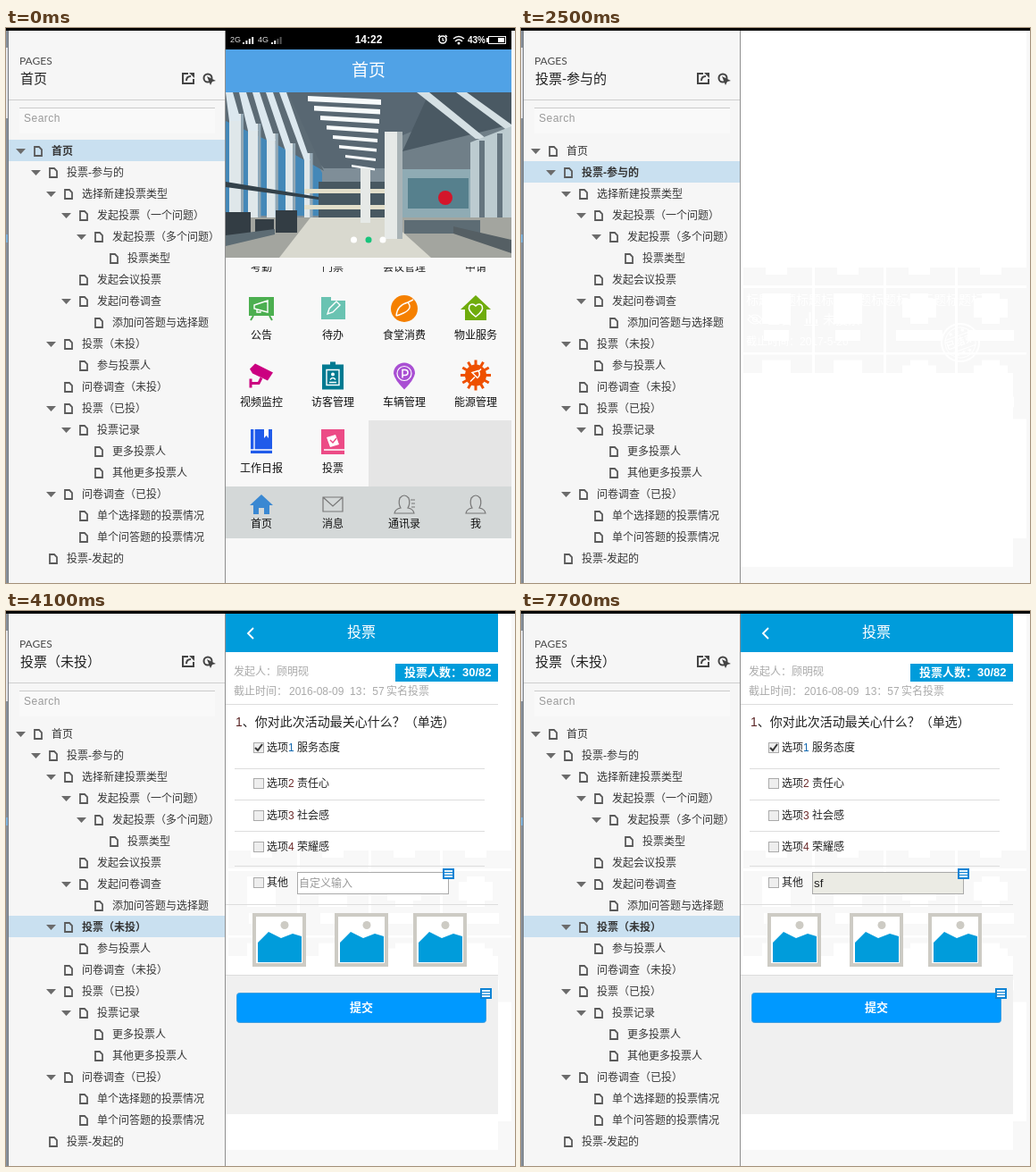
Write an HTML page with a canvas that moves like this. It is 570 by 621 pixels and loops after 8000 ms.

```html
<!DOCTYPE html>
<html lang="zh-CN">
<head>
<meta charset="utf-8">
<style>
html, body { margin: 0; width: 100%; height: 100%; overflow: hidden; background: #f8f8f8 }
canvas { display: block }
</style>
</head>
<body>
<canvas id="stage" width="570" height="621"></canvas>
<script>
const ctx = document.getElementById('stage').getContext('2d');
const FONT = '"Liberation Sans", "Noto Sans CJK SC", sans-serif';
const LOOP = 8000, BLUE = '#009cdb', PALE = '#f8f8f8';

// ---- helpers ----
function rect(x, y, w, h, color) {
  ctx.fillStyle = color;
  ctx.fillRect(x, y, w, h);
}
function frame(x, y, w, h, color) {
  ctx.strokeStyle = color;
  ctx.lineWidth = 1;
  ctx.strokeRect(x + .5, y + .5, w - 1, h - 1);
}
// y is the visual middle of the glyphs; returns the x where the text ends.
function text(s, x, y, size, color, align = 'left', weight = 400, font = FONT) {
  ctx.font = `${weight} ${size}px ${font}`;
  ctx.fillStyle = color;
  ctx.textAlign = align;
  ctx.textBaseline = 'middle';
  ctx.fillText(s, x, y + 1);
  return x + ctx.measureText(s).width;
}
// Each part is [path, color] to fill or [path, color, width] to stroke.
function draw(x, y, parts) {
  ctx.save();
  ctx.translate(x, y);
  for (const [d, color, width] of parts) {
    const path = new Path2D(d);
    ctx.fillStyle = ctx.strokeStyle = color;
    ctx.lineWidth = width || 1;
    if (width) ctx.stroke(path); else ctx.fill(path);
  }
  ctx.restore();
}
function clipped(x, y, w, h, paint) {
  ctx.save();
  ctx.beginPath();
  ctx.rect(x, y, w, h);
  ctx.clip();
  paint();
  ctx.restore();
}
const circle = (x, y, r) => `M${x - r} ${y}a${r} ${r} 0 1 0 ${2 * r} 0a${r} ${r} 0 1 0 ${-2 * r} 0z`;
function rays(count, inner, outer) {
  let d = '';
  for (let i = 0; i < count; i++) {
    const a = 2 * Math.PI * i / count, c = Math.cos(a), s = Math.sin(a);
    d += `M${c * inner} ${s * inner}L${c * outer} ${s * outer}`;
  }
  return d;
}

// ---- page tree: level digit, then title ----
const pages = `0首页
1投票-参与的
2选择新建投票类型
3发起投票（一个问题）
4发起投票（多个问题）
5投票类型
3发起会议投票
3发起问卷调查
4添加问答题与选择题
2投票（未投）
3参与投票人
2问卷调查（未投）
2投票（已投）
3投票记录
4更多投票人
4其他更多投票人
2问卷调查（已投）
3单个选择题的投票情况
3单个问答题的投票情况
1投票-发起的`.split('\n').map(s => ({ level: +s[0], title: s.slice(1) }));

function sidebar(selected) {
  rect(0, 0, 246, 621, '#f6f6f6');
  rect(0, 0, 2, 621, '#87909c');
  rect(0, 22, 2, 79, '#e4e6ea');
  rect(0, 231, 2, 9, '#7fb2dc');
  rect(2, 0, 1, 621, '#74797f');
  rect(245, 3, 1, 618, '#8f8f8f');
  text('PAGES', 15, 36, 12, '#4a4a4a', 'left', 400, 'Lato, sans-serif');
  text(pages[selected].title, 16, 57, 15, '#222', 'left', 500);
  draw(197, 50, [
    ['M7 1H1V12H13V7', '#444', 2], ['M5 9Q5 4 10 4', '#444', 2], ['M8 0H14V6z', '#444'],
    [circle(29, 6, 4.5), '#444', 2], ['M28 4L38 9L34 10L32 14z', '#444']
  ]);
  rect(3, 80, 242, 1, '#cfcfcf');
  rect(15, 89, 219, 29, '#f9f9f9');
  rect(15, 89, 219, 1, '#cbcbcb');
  ctx.letterSpacing = '.5px';
  text('Search', 20, 101, 12, '#999');
  ctx.letterSpacing = '0px';
  pages.forEach(({ level, title }, i) => {
    const x = 17 * level, y = 138 + 24 * i;
    if (i === selected) rect(3, y - 13, 242, 24, '#c9e0f0');
    if (pages[i + 1]?.level > level) draw(x, y, [['M11 -3H22L16.5 3z', '#6b6b6b']]);
    draw(x + 31, y - 6, [['M1 1H6L9 4V11H1z', '#5a5a5a', 1.8]]);
    text(title, x + 51, y, 12, '#363636', 'left', i === selected ? 700 : 400);
  });
}

// ---- home screen ----
const apps = [
  ['公告', [['M-14 -13H14V8H-14z', '#4caf50'], ['M-9 8L-12 13M9 8L12 13', '#4caf50', 2],
    ['M-8 -4L7 -9V4L-8 0zM-5 0V4H-1V1', '#fff', 1.4]]],
  ['待办', [['M-13 -13H-2V-9H14V12H-13z', '#6ac3b2'], ['M-6 6L-4 0L4 -8L8 -4L0 4z', '#fff', 1.4]]],
  ['食堂消费', [[circle(0, 0, 15), '#f58000'], ['M-9 8Q-8 -4 4 -7Q10 0 -1 5Q-5 7 -9 8M4 -7L10 -10', '#fff', 1.4]]],
  ['物业服务', [['M-17 1L0 -15L17 1H12V13H-12V1z', '#6fac0c'],
    ['M0 9C-14 -1 -5 -9 0 -3C5 -9 14 -1 0 9z', '#fff', 1.5]]],
  ['视频监控', [['M-13 -7L-7 -13L13 -3L7 6L-10 -2z', '#cb0080'], ['M0 3L-3 9H-12M-12 4V14', '#cb0080', 3]]],
  ['访客管理', [['M-12 -12H12V16H-12z', '#007a91'], ['M-3 -15H3V-9H-3z', '#007a91'],
    ['M-7 -6H7V11H-7zM-4 8H4M-3 5Q0 1 3 5', '#fff', 1.4], [circle(0, -1, 2), '#fff']]],
  ['车辆管理', [['M-12 -2A12 12 0 1 1 12 -2Q11 5 0 16Q-11 5 -12 -2z', '#a94fd3'], [circle(0, -2, 8), '#fff', 1.2],
    ['M-2 3V-6H1Q4 -6 4 -3T1 0H-2', '#fff', 1.5]]],
  ['能源管理', [[circle(0, 0, 12), '#ee5000'], [rays(12, 11, 17), '#ee5000', 3],
    ['M-4 -3L2 3Q6 0 3 -5zM-1 2L-6 7M3 -4L6 -7', '#fff', 1.5]]],
  ['工作日报', [['M-12 -14H12V13H-12z', '#205bea'], ['M-8 -14V9M-12 9H12', '#fff', 1.3], ['M3 -14H8V-4L5.5 -7L3 -4z', '#fff']]],
  ['投票', [['M-13 -14H13V14H-13z', '#ec4b86'], ['M-10 9H13', '#fff', 1.5],
    ['M-7 -5L3 -8L7 3L-3 6z', '#fff'], ['M-3 -2L0 1L4 -4', '#ec4b86', 1.5]]]
];
const appX = i => 286 + 80 * (i % 4);
const appY = i => 314 + 74.5 * Math.floor(i / 4);

function lobby() {
  const poly = (color, d) => draw(246, 72, [[d, color]]);
  rect(246, 72, 320, 185, '#7f8e98');
  poly('#586772', 'M30 0H320V70L200 85H110z');
  // window wall on the left
  poly('#4488b8', 'M0 0H60L108 90V138H0z');
  poly('#5c6b75', 'M0 0H70L110 88L60 60L0 32z');
  for (let i = 0; i < 5; i++) {
    const x = 4 + i * 21, top = 24 + i * 11, w = 13 - i * 1.6;
    poly('#dfe7ea', `M${x} ${top}h${w}V140h${-w}z`);
    poly('#93a7b3', `M${x + w} ${top}h3V140h-3z`);
    poly('#dce8ef', `M${i * 15} 0h8L${x + w} ${top + 8}h${-w}z`);
  }
  poly('#33414a', 'M0 100L104 117V120L0 106z');
  // ceiling lights
  for (let i = 0; i < 8; i++) {
    const y = 4 + i * 11, w = 82 - i * 8;
    poly('#f7fafb', `M${92 + i * 7} ${y}l${w} 4v${6 - i * .5}l${-w} -4z`);
  }
  poly('#707f88', 'M198 48L320 0V150H198z');
  poly('#4a5963', 'M228 0H320V36L198 66z');
  poly('#d5e0e4', 'M214 0H228L292 52H280zM258 0H270L320 36V46z');
  // back wall and reception
  poly('#485861', 'M104 100H185V140H104z');
  poly('#e3dfca', 'M88 108H184V113H88zM88 126H184V131H88z');
  poly('#8fabb4', 'M198 86H274V150H198z');
  poly('#56808d', 'M204 96H272V130H204z');
  poly('#bccbd0', 'M274 56L320 38V165L274 152z');
  poly('#65757f', 'M284 54H290V156H284zM304 46H310V162H304z');
  // floor and furniture
  poly('#a3a59f', 'M0 140H320V185H0z');
  poly('#d9d9cf', 'M95 140H180L230 185H60z');
  poly('#e6e9e7', 'M178 44H198V164H178zM151 85H162V146H151z');
  poly('#a9b3b6', 'M192 44H198V164H192z');
  poly('#333d44', 'M0 134H28V165H0zM33 142H54V156H33zM56 132H80V157H56z');
  poly('#5d6c74', 'M200 143H285V158H200zM0 160L55 153V159L0 172z');
  poly('#555f64', 'M255 150L320 165V180L255 158z');
  poly('#d4152a', circle(246, 118, 8));
  poly('#fff', circle(143.5, 165, 3.5) + circle(176, 165, 3.5));
  poly('#18c47c', circle(160, 165, 3.5));
}

function statusBar() {
  rect(246, 3, 320, 21, '#000');
  text('2G', 251, 13, 9, '#ddd');
  text('4G', 282, 13, 9, '#ddd');
  for (let i = 0; i < 4; i++) {
    rect(265 + 3.4 * i, 16 - 2 * i, 2, 2 + 2 * i, '#eee');
    rect(297 + 3.2 * i, 16 - 2 * i, 2, 2 + 2 * i, i < 2 ? '#eee' : '#555');
  }
  text('14:22', 406, 13, 12, '#fff', 'center', 700);
  draw(489, 13, [[circle(0, 0, 4), '#fff', 1.6], ['M0 -2V1H2M-5 -3L-3 -5M5 -3L3 -5', '#fff', 1.2]]);
  draw(507, 17, [['M-6 -5Q0 -10 6 -5M-4 -2Q0 -6 4 -2', '#fff', 1.5], [circle(0, 0, 1.5), '#fff']]);
  text('43%', 517, 13, 10, '#fff', 'left', 700);
  frame(540, 9, 20, 9, '#fff');
  rect(538, 11, 2, 5, '#fff');
  rect(551, 11, 7, 5, '#fff');
}

function home() {
  rect(246, 3, 324, 618, PALE);
  statusBar();
  rect(246, 24, 320, 48, '#50a2e6');
  text('首页', 406, 48, 19, '#fff', 'center');
  lobby();
  clipped(246, 267, 320, 20, () =>
    ['考勤', '门票', '会议管理', '申请'].forEach((s, i) => text(s, appX(i), 268, 12, '#222', 'center')));
  apps.forEach(([name, parts], i) => {
    draw(appX(i), appY(i), parts);
    text(name, appX(i), appY(i) + 30, 12, '#111', 'center');
  });
  rect(406, 439, 160, 74, '#e5e5e5');
  rect(246, 513, 320, 58, '#d4d8d8');
  const person = 'M-11 10Q-10 5 -4 4Q-7 -1 -5 -7Q0 -13 5 -7Q7 -1 4 4Q10 5 11 10z';
  const tabs = [
    ['首页', [['M-13 1L0 -11L13 1H9V11H3V4H-3V11H-9V1z', '#3a88d2']]],
    ['消息', [['M-11 -8H11V8H-11zM-11 -8L0 2L11 -8', '#777', 1.2]]],
    ['通讯录', [[person, '#777', 1.2], ['M7 -5H12M8 -1H12M8 3H12', '#777', 1.2]]],
    ['我', [[person, '#777', 1.2]]]
  ];
  tabs.forEach(([name, parts], i) => {
    draw(appX(i), 533, parts);
    text(name, appX(i), 555, 12, '#111', 'center');
  });
}

// ---- blank page with the faint remains of the icon grid ----
function ghost() {
  rect(246, 3, 324, 618, PALE);
  rect(246, 3, 320, 568, '#fff');
  for (let i = 0; i < 4; i++) {
    rect(249 + 80 * i, 268, 77, 20, PALE);
    rect(appX(i) - 12, 268, 24, 8, '#fff');
  }
  apps.forEach((app, i) => {
    const x = appX(i), y = appY(i), w = 12 * app[0].length + 4;
    rect(249 + 80 * (i % 4), y - 23, 77, 72, PALE);
    draw(x, y, [[i % 4 < 2 ? 'M-16 -17H16V17H-16z' : 'M-10 -17H10V-11H19V10H10V17H-10V10H-19V-11H-10z', '#fff']]);
    rect(x - w / 2, y + 24, w, 12, '#fff');
  });
}
function fadedGhost() {
  ghost();
  rect(246, 386, 305, 217, '#fff');
}

// ---- shared parts of the two blue pages ----
function topBar() {
  rect(246, 3, 305, 43, BLUE);
  draw(273, 25, [['M4 -6L-2 0L4 6', '#fff', 1.8]]);
}
function note(x, y) {
  rect(x, y, 13, 12, '#0f83d4');
  for (let i = 0; i < 3; i++) rect(x + 2, y + 2 + 3 * i, 9, 2, '#e4f2fb');
}

// ---- vote list ----
function stamp(y, label, color, r) {
  ctx.save();
  ctx.translate(492, y);
  ctx.rotate(-.35);
  draw(0, 0, [[circle(0, 0, r), color, 2], [circle(0, 0, r - 4), color, 1],
    [`M${-r + 5} -8H${r - 5}M${-r + 5} 8H${r - 5}`, color, 1]]);
  text(label, 0, -1, 11, color, 'center', 700);
  for (const x of [-7, 0, 7]) {
    text('★', x, -13, 6, color, 'center');
    text('★', x, 11, 6, color, 'center');
  }
  ctx.restore();
}
function card(y, title, named, voted, meeting, status, white) {
  const dark = white || '#222', gray = white || '#999';
  const barColor = white || (voted ? '#1296db' : '#999');
  text(title, 252, y, 14, dark);
  draw(262, y + 22, [['M-8 0Q0 -10 8 0Q0 10 -8 0z', white || '#aaa', 1.2], [circle(0, 0, 2.5), white || '#aaa', 1.2]]);
  if (!named) draw(262, y + 22, [['M-7 -5L7 5', gray, 1.4]]);
  text(named ? '实名' : '匿名', 276, y + 22, 14, dark);
  [6, 13, 9, 5].forEach((h, i) => rect(319 + 3.6 * i, y + 27 - h, 2, h, barColor));
  rect(317, y + 28, 16, 1, barColor);
  text(voted ? '已投票' : '未投票', 338, y + 22, 14, dark);
  if (meeting) text('关联会议：布兰维诺', 252, y + 48, 14, dark);
  const dateY = y + (meeting ? 71 : 47);
  text('截止时间：', 252, dateY, 12, gray);
  text('2017-5-20', 312, dateY, 12, gray);
  const active = status === '进行中';
  stamp(y + 48, status, white || (active ? '#1b98dc' : '#959595'), active ? 23 : 21);
}
const lastCard = white => card(304, '标题'.repeat(9) + '标', false, false, false, '已结束', white);

function list() {
  ghost();
  topBar();
  rect(335, 11, 63, 28, '#fff');
  frame(335, 11, 63, 28, '#c4e4f5');
  rect(398, 11, 64, 28, '#55a5e6');
  frame(398, 11, 64, 28, '#fff');
  text('参与的', 366, 24, 13, '#1296db', 'center');
  text('发起的', 430, 24, 13, '#fff', 'center');
  draw(524, 26, [['M-9.5 0H9.5M0 -9.5V9.5', '#fff', 1.6]]);
  rect(246, 46, 305, 243, '#fff');
  for (const y of [152, 274, 386]) rect(246, y, 305, 15, '#dedede');
  rect(246, 401, 305, 202, '#f0f0f0');
  rect(246, 602, 305, 1, '#ddd');
  rect(550, 46, 1, 557, '#e2e2e2');
  card(60, '第十二届岚禾云册会议投票', true, false, true, '进行中');
  card(182, '标题2标题2', true, true, true, '已结束');
  lastCard();
  for (const [x, y] of [[455, 8], [533, 8], [544, 42], [372, 96], [544, 164], [544, 286]]) note(x, y);
}

// ---- vote form ----
function checkbox(y, state) {
  rect(277, y - 6, 12, 12, state === 'pressed' ? '#d4d4d4' : '#eee');
  frame(277, y - 6, 12, 12, state === 'pressed' ? '#888' : '#aaa');
  if (state === 'on') draw(283, y, [['M-4 0L-1 3L4 -4', '#333', 2]]);
}
function field(t) {
  const value = 'sf'.slice(0, t < 6500 ? 0 : t < 6600 ? 1 : 2);
  const focused = t >= 6100 && t < 7600;
  rect(326, 292, 170, 25, t >= 7700 ? '#ebebe4' : '#fff');
  frame(326, 292, 170, 25, '#aaa');
  if (focused) {
    frame(325, 291, 172, 27, '#8db8f5');
    frame(326, 292, 170, 25, '#4d90fe');
  }
  const end = value ? text(value, 328, 304, 13.3, '#222') : 328;
  if (!value) text('自定义输入', 328, 305, 12, '#999');
  if (focused && t >= 6200 && t < 7100) rect(Math.round(end) + 1, 297, 1, 15, '#000');
}
function picture(x) {
  rect(x, 338, 60, 60, '#cdcbc4');
  rect(x + 4, 342, 52, 52, '#fff');
  draw(x, 338, [['M6 55V33L18 21L32 28L45 23L55 26V55z', BLUE], [circle(36, 13.5, 4.5), '#cdcbc4']]);
}
function form(t) {
  fadedGhost();
  topBar();
  text('投票', 398, 24, 16, '#fff', 'center');
  rect(246, 46, 305, 222, '#fff');
  text('发起人：顾明砚', 255, 68, 12, '#aaa');
  rect(436, 59, 115, 20, BLUE);
  text('投票人数：30/82', 446, 68, 13, '#fff', 'left', 700);
  text('截止时间：', 255, 90, 12, '#aaa');
  text('2016-08-09', 317, 90, 12, '#aaa');
  text('13：57', 385, 90, 12, '#aaa');
  text('实名投票', 426, 90, 12, '#aaa');
  rect(246, 104, 305, 1, '#ddd');
  text('、你对此次活动最关心什么？（单选）', text('1', 257, 124, 14, '#5a2525'), 124, 14, '#222');
  ['服务态度', '责任心', '社会感', '荣耀感'].forEach((name, i) => {
    const y = [153, 193, 229, 264][i];
    checkbox(y, i || t < 3900 ? 'off' : t < 4100 ? 'pressed' : 'on');
    let x = text('选项', 292, y, 12, '#222');
    x = text(i + 1, x, y, 12, i ? '#6b2a2a' : '#1268b0');
    text(' ' + name, x, y, 12, '#222');
    rect(256, [176, 211, 246, 285][i], 280, 1, '#ddd');
  });
  checkbox(304, t < 5700 || t >= 7700 ? 'off' : t < 7600 ? 'on' : 'pressed');
  text('其他', 292, 304, 12, '#222');
  field(t);
  note(489, 288);
  rect(246, 328, 305, 1, '#ddd');
  [276, 368, 456].forEach(picture);
  rect(246, 407, 305, 156, '#f0f0f0');
  rect(246, 407, 305, 1, '#ddd');
  ctx.beginPath();
  ctx.roundRect(258.5, 427.5, 279, 33, 3);
  ctx.fillStyle = '#0099ff';
  ctx.fill();
  ctx.strokeStyle = '#3f9fe0';
  ctx.lineWidth = 1;
  ctx.stroke();
  text('提交', 398, 443, 13, '#fff', 'center', 700);
  note(531, 422);
}

function render() {
  const t = performance.now() % LOOP;
  sidebar(t < 700 ? 0 : t < 2600 ? 1 : 9);
  if (t < 500) home();
  else if (t < 700) ghost();
  else if (t < 2500) list();
  else if (t < 2600) { fadedGhost(); lastCard('#fff'); }
  else form(t);
  rect(0, 0, 570, 3, '#000');
  requestAnimationFrame(render);
}
render();
</script>
</body>
</html>
```
